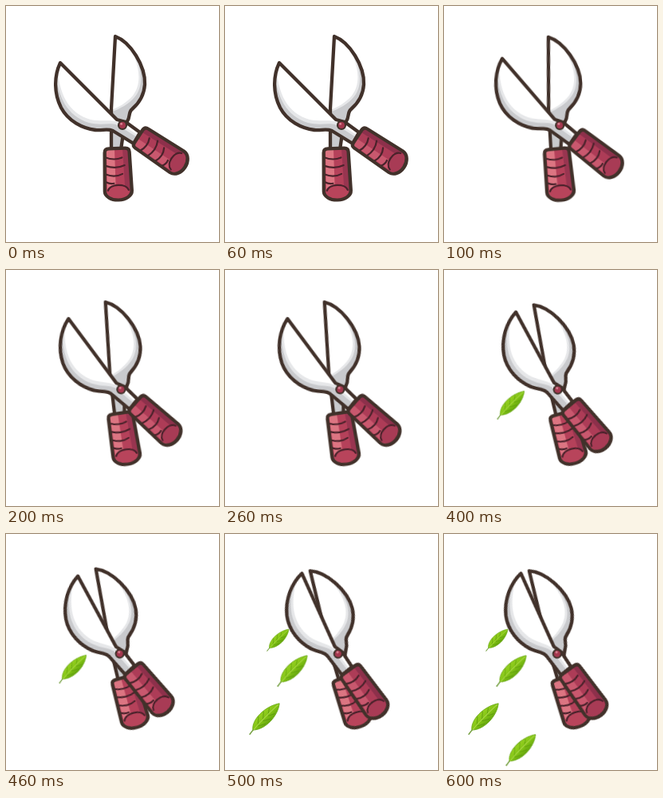
Write an HTML page that moves like this. It is 267x295 px and loops after 0.7 s.

```html
<!DOCTYPE html>
<html lang="en">
<head>
<meta charset="utf-8">
<title>Garden shears</title>
<style>
  html, body { margin: 0; width: 100%; height: 100%; overflow: hidden; background: #fff; }
  svg { display: block; width: 100vw; height: 100vh; }

  .half { transform-origin: 146px 149px; animation: 700ms steps(5, end) infinite; }
  .front { animation-name: close-front; }
  .back { animation-name: close-back; }
  @keyframes close-front {
    0% { transform: translate(0, 0) rotate(0deg); }
    71.428%, 100% { transform: translate(-4.2px, 0.8px) rotate(20.7deg); }
  }
  @keyframes close-back {
    0% { transform: translate(0, 0) rotate(0deg); }
    71.428%, 100% { transform: translate(1.5px, 0.8px) rotate(-16.8deg); }
  }

  .leaf { opacity: 0; animation: 700ms step-end infinite; }
  .first { animation-name: leaf-first; }
  .second { animation-name: leaf-second; }
  .third { animation-name: leaf-third; }
  @keyframes leaf-first {
    0% { opacity: 0; transform: translate(66px, 186px) rotate(-45deg) scale(.91); }
    57.142% { opacity: 1; transform: translate(66px, 186px) rotate(-45deg) scale(.91); }
    71.428%, 100% { opacity: 1; transform: translate(65px, 190px) rotate(-45deg) scale(1); }
  }
  @keyframes leaf-second { 0% { opacity: 0; } 71.428%, 100% { opacity: 1; } }
  @keyframes leaf-third { 0% { opacity: 0; } 85.714%, 100% { opacity: 1; } }

  .ink { fill: none; stroke: #41312a; stroke-width: 4.3; stroke-linejoin: round; stroke-linecap: round; }
  .steel { fill: #fff; }
  .tint { fill: #e6e7e9; }
  .shade { fill: #c9cacd; }
  .ring { fill: none; stroke: #4a222b; stroke-width: 2.2; stroke-linecap: round; }
  .front { --base: #ad3c57; --light: #c9586e; --dark: #8d304b; --end: #a83b55; }
  .back { --base: #b5415a; --light: #dc7582; --dark: #983550; --end: #b8445b; }
</style>
</head>
<body>
<svg viewBox="0 0 267 295" preserveAspectRatio="none">
  <defs>
    <path id="bladeA" d="M68 71 C60 88 60 109 69 127 C78 144 96 153 112 155 C121 156 127 153 134 156 L160 172 L168 158 L150 145 L139 142 Z"/>
    <path id="bladeB" d="M137 38 C156 45 175 75 174 98 C173 114 165 123 158 129 C153 133 156 139 152 144 L148 152 L144 180 L132 180 L132 128 Z"/>
    <clipPath id="clipA"><use href="#bladeA"/></clipPath>
    <clipPath id="clipB"><use href="#bladeB"/></clipPath>

    <path id="grip" d="M-15.5 4 Q-15.5 -1 -10 -1 L10 -1 Q15.5 -1 15.5 4 L17 54 A17 11.5 0 0 1 -17 54 Z"/>
    <clipPath id="clipGrip"><use href="#grip"/></clipPath>
    <g id="handle">
      <use href="#grip" fill="var(--base)"/>
      <g clip-path="url(#clipGrip)">
        <path d="M-13 -2 H-3 L-3 62 H-14 Z" fill="var(--light)"/>
        <path d="M7 -2 H18 V66 H9 Z" fill="var(--dark)"/>
      </g>
      <ellipse cy="55" rx="14" ry="9" fill="var(--end)"/>
      <path class="ring" d="M-13 53 C-10 44 10 44 13 53"/>
      <path class="ring" d="M-15 10 Q-4 15 6 11 M-15 21 Q-2 26 9 21 M-15 32 Q-4 37 6 32 M-15 42 Q-10 45 -5 44"/>
      <use href="#grip" class="ink"/>
    </g>

    <linearGradient id="green" x1="0" y1="0" x2="0" y2="1">
      <stop offset="0" stop-color="#96d022"/>
      <stop offset=".5" stop-color="#82c414"/>
      <stop offset="1" stop-color="#65a60d"/>
    </linearGradient>
    <g id="leaf">
      <path d="M7 0 C14 -10 38 -11 54 0 C42 10 18 11 7 0 Z" fill="url(#green)" stroke="#6aa81a" stroke-width=".8"/>
      <path d="M16 0 L24 -7 M25 0 L33 -7 M34 0 L41 -5 M15 1 L24 6 M24 1 L33 6 M33 1 L41 5" fill="none" stroke="#5c980f" stroke-width=".8"/>
      <path d="M7 .5 Q24 -1 52 0" fill="none" stroke="#aad74a" stroke-width="1"/>
      <path d="M0 1 L8 0" stroke="#6f9c3a" stroke-width="1.4"/>
    </g>
  </defs>

  <g class="half back">
    <use href="#bladeB" class="steel"/>
    <g clip-path="url(#clipB)">
      <path class="tint" d="M148 40 C166 66 173 94 159 112 C151 121 142 126 132 130 V182 H180 V40 Z"/>
      <path class="shade" d="M154 46 C170 72 174 98 162 113 C154 123 143 128 132 133 V182 H180 V46 Z"/>
    </g>
    <use href="#bladeB" class="ink"/>
    <use href="#handle" transform="translate(139 179) rotate(-2) scale(1 .97)"/>
  </g>

  <g class="half front">
    <use href="#bladeA" class="steel"/>
    <g clip-path="url(#clipA)">
      <path class="tint" d="M64 72 C66 110 78 134 106 142 C122 145 132 141 142 146 L166 162 L160 174 L110 170 L58 140 Z"/>
      <path class="shade" d="M62 84 C66 114 76 137 104 146 C120 150 130 145 140 149 L166 165 L160 176 L110 172 L56 140 Z"/>
    </g>
    <use href="#bladeA" class="ink"/>
    <use href="#handle" transform="translate(167 163.5) rotate(-56.5) scale(.94 1.05)"/>
    <circle cx="146" cy="149" r="5" fill="#a5384f" stroke="#41312a" stroke-width="2.2"/>
    <circle cx="144.6" cy="147.4" r="1.4" fill="#d98795"/>
  </g>

  <use href="#leaf" class="leaf first"/>
  <g class="leaf second">
    <use href="#leaf" transform="translate(52 146) rotate(-44) scale(.72)"/>
    <use href="#leaf" transform="translate(30 250) rotate(-45)"/>
  </g>
  <g class="leaf third">
    <use href="#leaf" transform="translate(77 289) rotate(-45.5)"/>
  </g>
</svg>
</body>
</html>
```
